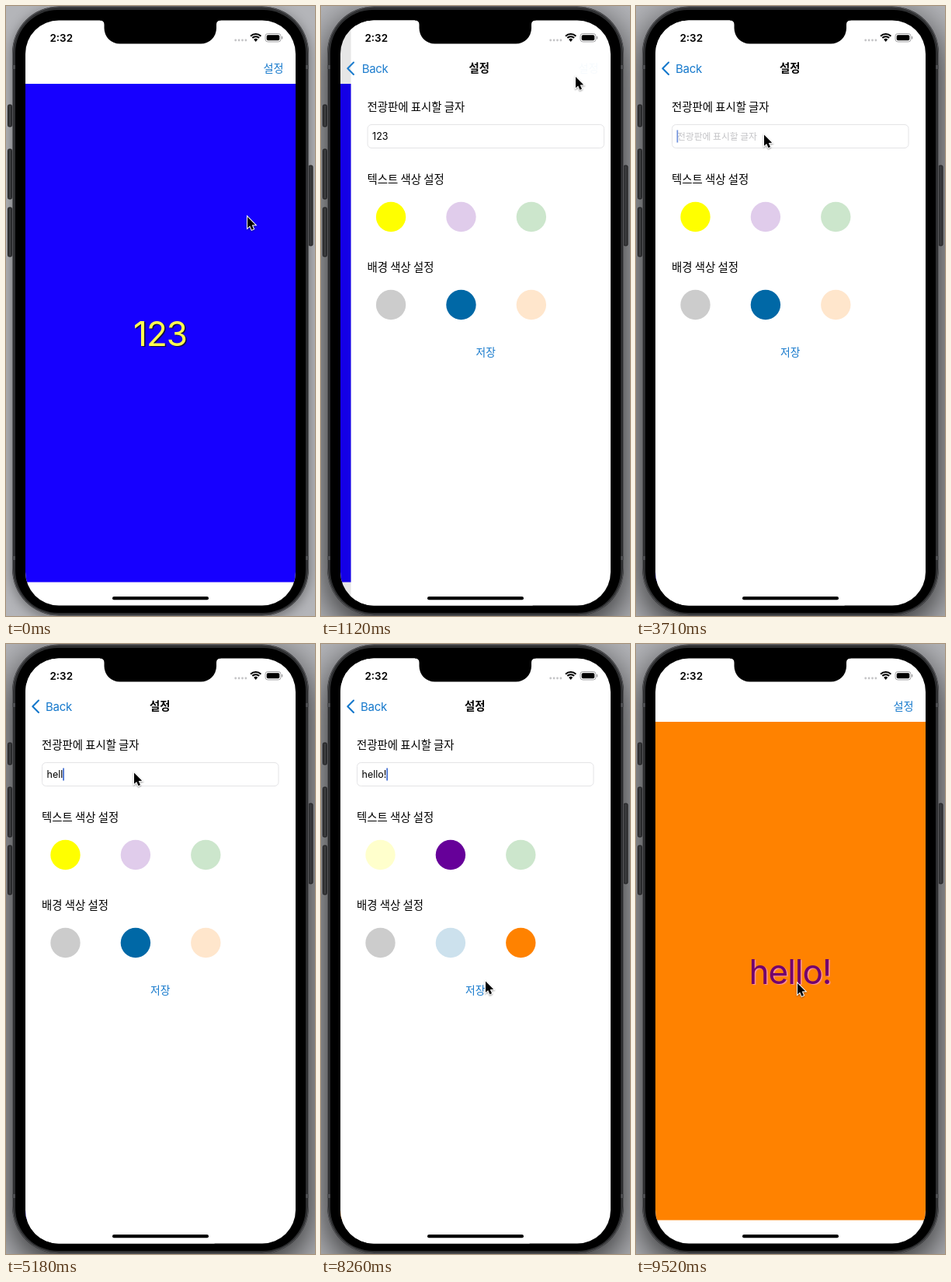
Recreate the animation shown at these times as an HTML page with a canvas. Size 398 px wide and 784 px high, loop 9590 ms.

```html
<!DOCTYPE html>
<html lang="ko">
<head>
<meta charset="utf-8">
<style>
html, body { margin: 0; width: 100%; height: 100%; overflow: hidden; background: #b4b5b9; }
canvas { display: block; }
</style>
</head>
<body>
<canvas id="stage" width="398" height="784"></canvas>
<script>
const ctx = document.getElementById('stage').getContext('2d');
const LOOP = 9590;
const LATIN = 'Inter, "Liberation Sans", sans-serif';
const KOREAN = '"Noto Sans CJK KR", "Noto Sans CJK", sans-serif';
const TINT = '#1679cc';
const LEFT = 25, WIDTH = 348;
const ACTIVATE = 690, PUSH = 733, PICK_TEXT = 6705, PICK_BACK = 7545, POP = 8550;

// Pointer path: time, x, y
const path = [
  [20, 311, 271], [450, 345, 60], [560, 342, 74], [690, 342, 74], [1120, 328, 91],
  [1610, 174, 144], [1820, 165, 165.5], [6030, 165, 165.5], [6580, 161, 261.5],
  [6690, 161, 261.5], [7350, 264, 398], [7630, 258, 388], [7710, 258, 388],
  [8200, 212, 433.5], [8400, 212, 433.5], [8890, 207, 438], [9170, 201, 439],
  [9390, 201, 439], [9450, 205, 433], [9520, 208, 436]
];

// Field edits; each one restarts the caret blink
const edits = [
  [1805, '123'], [2645, '12'], [2785, '1'], [2925, ''], [3135, ''], [3765, 'h'],
  [4675, 'he'], [4955, 'hel'], [5165, 'hell'], [5375, 'hello'], [5865, 'hello!']
];

const spring = ms => ms < 0 ? 1 : (1 + 0.013 * ms) * Math.exp(-0.013 * ms);

function pointerAt(t) {
  const i = path.findIndex(p => p[0] > t);
  if (i === 0) return path[0].slice(1);
  if (i < 0) return path[path.length - 1].slice(1);
  const [t0, x0, y0] = path[i - 1], [t1, x1, y1] = path[i];
  const u = (t - t0) / (t1 - t0), e = u * u * (3 - 2 * u);
  return [x0 + (x1 - x0) * e, y0 + (y1 - y0) * e];
}

function box(x, y, w, h, r, fill, stroke) {
  ctx.beginPath();
  ctx.roundRect(x, y, w, h, r);
  if (fill) { ctx.fillStyle = fill; ctx.fill(); }
  if (stroke) { ctx.strokeStyle = stroke; ctx.lineWidth = 1; ctx.stroke(); }
}

function text(str, x, y, size, color, family = KOREAN, weight = 400, spacing = 0) {
  ctx.font = `${weight} ${size}px ${family}`;
  ctx.letterSpacing = spacing + 'px';
  ctx.fillStyle = color;
  ctx.fillText(str, x, y);
}

function dot(x, y, r, color, alpha = 1) {
  ctx.globalAlpha = alpha;
  ctx.fillStyle = color;
  ctx.beginPath();
  ctx.arc(x, y, r, 0, 7);
  ctx.fill();
  ctx.globalAlpha = 1;
}

function drawPhone(active) {
  ctx.fillStyle = '#b4b5b9';
  ctx.fillRect(0, 0, 398, 784);
  ctx.save();
  ctx.shadowColor = active ? 'rgba(0,0,0,.8)' : 'rgba(0,0,0,.4)';
  ctx.shadowBlur = active ? 48 : 16;
  ctx.shadowOffsetY = active ? 14 : 4;
  box(8, 0.5, 382, 783, 60, '#2e2f31');
  ctx.restore();
  for (const [x, y, h] of [[2.5, 127, 28], [2.5, 184, 64], [2.5, 259, 63], [390, 205, 103]])
    box(x, y, 5, h, 1.5, '#38393b', '#1c1c1e');
  box(8.5, 1, 381, 782, 60, '#2e2f31', '#59595c');
  ctx.fillStyle = '#4b4c4f';
  for (const y of [76, 707]) {
    ctx.fillRect(8, y, 4, 5);
    ctx.fillRect(386, y, 4, 5);
  }
  box(12, 5, 374, 775, 55, '#000');
}

function drawHome(t, q) {
  const saved = t > PICK_BACK;
  ctx.save();
  ctx.translate(-0.3 * WIDTH * (1 - q), 0);
  ctx.fillStyle = '#fff';
  ctx.fillRect(LEFT, 18, WIDTH, 753);
  ctx.fillStyle = saved ? '#ff8200' : '#1600ff';
  ctx.fillRect(LEFT, 100, WIDTH, 640.5);
  ctx.textAlign = 'center';
  ctx.shadowColor = saved ? 'rgba(255,150,190,.85)' : 'rgba(20,20,20,.9)';
  ctx.shadowOffsetX = ctx.shadowOffsetY = 1.5;
  ctx.shadowBlur = 1;
  text(saved ? 'hello!' : '123', 198.5, 436.5, 44, saved ? '#73006c' : '#ffff50', LATIN, 400, -1);
  ctx.restore();
  ctx.fillStyle = `rgba(0,0,0,${0.1 * (1 - q)})`;
  ctx.fillRect(LEFT, 18, WIDTH, 753);
}

function drawField(t) {
  box(46.5, 152.5, 304.5, 30, 5, '#fff', '#e4e4e6');
  const edit = edits.filter(e => e[0] <= t).pop();
  const value = edit ? edit[1] : '123';
  if (value) text(value, 52.5, 172, 12.5, '#000', LATIN);
  else text('전광판에 표시할 글자', 53, 172, 11.8, '#c3c3c6');
  if (!edit) return;
  ctx.font = `12.5px ${LATIN}`;
  const phase = (t - edit[0]) % 1000;
  const off = Math.min(1, Math.max(0, (phase - 540) / 140));
  const on = Math.max(0, (phase - 880) / 120);
  ctx.globalAlpha = 1 - off + on;
  ctx.fillStyle = '#3f6bd0';
  ctx.fillRect(52.5 + (value ? ctx.measureText(value).width : 0), 159.5, 1.7, 16);
  ctx.globalAlpha = 1;
}

function drawSettings(t, q) {
  ctx.save();
  ctx.translate(WIDTH * q, 0);
  ctx.fillStyle = '#fff';
  ctx.fillRect(LEFT, 18, WIDTH, 753);
  text('전광판에 표시할 글자', 46, 135.3, 14.4, '#000');
  drawField(t);
  const swatches = (label, y, colors, chosen) => {
    text(label, 46, y - 43, 14.4, '#000');
    colors.forEach((c, i) => dot(76.5 + 90.4 * i, y, 19.2, c, i === chosen ? 1 : 0.2));
  };
  swatches('텍스트 색상 설정', 271, ['#ff0', '#609', '#008000'], t < PICK_TEXT ? 0 : 1);
  swatches('배경 색상 설정', 384, ['#000', '#0068a6', '#ff8200'], t < PICK_BACK ? 1 : 2);
  text('저장', 186, 450, 13.8, TINT);
  ctx.restore();
}

function drawNavBar(q) {
  ctx.globalAlpha = q;
  text('설정', 331.5, 84.7, 14.2, TINT);
  ctx.globalAlpha = 1 - q;
  text('설정', 185 + 140 * q, 85, 14.4, '#000', KOREAN, 700);
  text('Back', 51 + 43 * q, 85.5, 15, TINT, LATIN, 400, -0.3);
  ctx.strokeStyle = TINT;
  ctx.lineWidth = 2.1;
  ctx.lineCap = ctx.lineJoin = 'round';
  ctx.beginPath();
  ctx.moveTo(42, 72.5);
  ctx.lineTo(34.3, 80.2);
  ctx.lineTo(42, 88);
  ctx.stroke();
  ctx.globalAlpha = 1;
}

function drawStatus() {
  text('2:32', 56.5, 45.6, 13.4, '#000', LATIN, 600);
  for (let i = 0; i < 4; i++) dot(295.7 + 4.4 * i, 44, 1.4, '#c4c4c6');
  ctx.strokeStyle = '#000';
  ctx.lineCap = 'butt';
  ctx.lineWidth = 2.1;
  for (const r of [9.4, 6.2]) {
    ctx.beginPath();
    ctx.arc(321.7, 45.4, r, -Math.PI * 0.75, -Math.PI * 0.25);
    ctx.stroke();
  }
  ctx.fillStyle = '#000';
  ctx.beginPath();
  ctx.moveTo(321.7, 46);
  ctx.arc(321.7, 45.6, 3.6, -Math.PI * 0.75, -Math.PI * 0.25);
  ctx.fill();
  box(334, 35.5, 20, 10.5, 3.3, null, '#a2a2a4');
  box(335.7, 37.2, 16.6, 7.1, 1.8, '#000');
  box(355, 39, 1.3, 3.6, 0.6, '#a2a2a4');
}

function drawNotch() {
  ctx.fillStyle = '#000';
  ctx.beginPath();
  ctx.moveTo(121, 17);
  ctx.lineTo(121, 18.5);
  ctx.quadraticCurveTo(126.5, 18.5, 126.5, 24);
  ctx.arcTo(126.5, 48.5, 150, 48.5, 20);
  ctx.arcTo(271, 48.5, 271, 24, 20);
  ctx.lineTo(271, 24);
  ctx.quadraticCurveTo(271, 18.5, 276.5, 18.5);
  ctx.lineTo(276.5, 17);
  ctx.fill();
}

function drawPointer([x, y]) {
  ctx.save();
  ctx.translate(x, y);
  ctx.beginPath();
  [[0, 0], [0, 14.3], [3.2, 11.4], [5.5, 16.7], [8, 15.6], [5.7, 10.5], [10.2, 10.3]]
    .forEach(p => ctx.lineTo(...p));
  ctx.closePath();
  ctx.shadowColor = 'rgba(0,0,0,.4)';
  ctx.shadowBlur = 2;
  ctx.shadowOffsetY = 1;
  ctx.strokeStyle = '#fff';
  ctx.lineWidth = 2;
  ctx.lineJoin = 'miter';
  ctx.stroke();
  ctx.shadowColor = 'transparent';
  ctx.fillStyle = '#000';
  ctx.fill();
  ctx.restore();
}

function draw(t) {
  // q: 1 while the home view shows, 0 while settings covers it
  const q = t < POP ? spring(t - PUSH) : 1 - spring(t - POP);
  drawPhone(t >= ACTIVATE);
  ctx.save();
  ctx.beginPath();
  ctx.roundRect(LEFT, 18.5, WIDTH, 752, 43);
  ctx.clip();
  drawHome(t, q);
  if (q < 1) drawSettings(t, q);
  drawNavBar(q);
  drawStatus();
  ctx.restore();
  drawNotch();
  box(137, 759, 124, 4.3, 2.1, '#000');
  drawPointer(pointerAt(t));
}

const start = performance.now();
function tick() {
  draw((performance.now() - start) % LOOP);
  requestAnimationFrame(tick);
}
tick();
</script>
</body>
</html>
```
